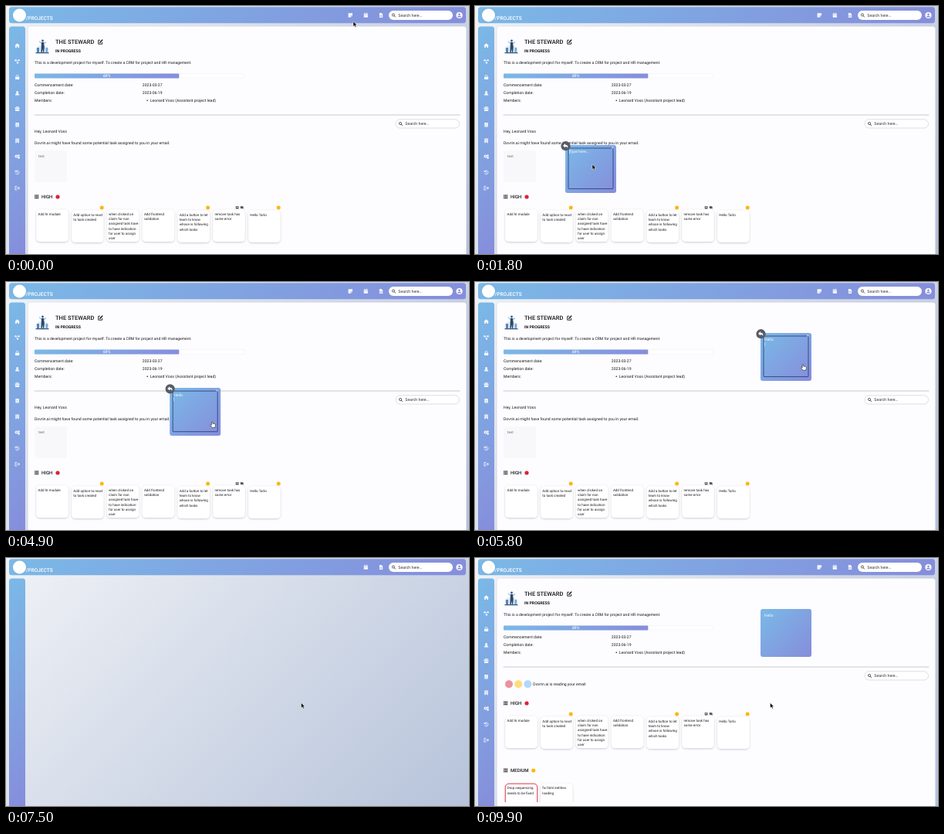
An HTML page for the animation above (10000 ms loop, 600 px wide and 321 px high).

```html
<!DOCTYPE html>
<html lang="en">
<head>
<meta charset="utf-8">
<title>Project page</title>
<style>
html, body { margin: 0; width: 100%; height: 100%; overflow: hidden; background: #d3dae8; }
svg { display: block; width: 100vw; height: 100vh; }
text { font-family: Roboto, Arial, sans-serif; white-space: pre; text-rendering: geometricPrecision; }
</style>
</head>
<body>
<svg id="stage" viewBox="0 0 600 321" preserveAspectRatio="none"></svg>
<script>
const LOOP = 10000, STEP = 100;
const INK = '#17181c', BLUE = '#7ab9e7', VIOLET = '#868ddb';

// ---- drawing helpers ----
const rect = (x, y, w, h, fill, r = 0, more = '') =>
  `<rect x="${x}" y="${y}" width="${w}" height="${h}" rx="${r}" fill="${fill}" ${more}/>`;
const dot = (x, y, r, fill, more = '') => `<circle cx="${x}" cy="${y}" r="${r}" fill="${fill}" ${more}/>`;
const path = (d, fill, more = '') => `<path d="${d}" fill="${fill}" ${more}/>`;
const line = (d, color, w) => path(d, 'none', `stroke="${color}" stroke-width="${w}" stroke-linecap="round" stroke-linejoin="round"`);
const text = (x, y, s, size = 5.12, fill = INK, weight = 400, more = '') =>
  `<text x="${x}" y="${y}" font-size="${size}" fill="${fill}" font-weight="${weight}" ${more}>${s}</text>`;
const group = (s, more = '') => `<g ${more}>${s}</g>`;
const at = (x, y, s) => group(s, `transform="translate(${x} ${y})"`);

// Diagonal 135 degree gradient over a box
function slant(id, x, y, w, h, from, to) {
  const cx = x + w / 2, cy = y + h / 2, d = (w + h) / 4;
  return `<linearGradient id="${id}" gradientUnits="userSpaceOnUse" x1="${cx - d}" y1="${cy - d}" x2="${cx + d}" y2="${cy + d}">
    <stop stop-color="${from}"/><stop offset="1" stop-color="${to}"/></linearGradient>`;
}

const lens = (x, y) => dot(x, y, 1.6, 'none', `stroke="${INK}" stroke-width=".65"`) +
  line(`M${x + 1.3} ${y + 1.3}l1.4 1.4`, INK, .7);

// Icons are centred on 0,0 and about 6 px wide
const W = '#f5f8ff';
const icons = {
  note: path('M-2.7-2.7h5.4v3.3l-2.1 2.1h-3.3z', W) + path('M.6 2.7v-2.1h2.1', 'none', `stroke="${VIOLET}" stroke-width=".5"`),
  calendar: rect(-2.6, -2.2, 5.2, 5, W, .5) + line('M-1.3-2.9v1M1.3-2.9v1', W, .8) + line('M-2.4-.8h4.8', VIOLET, .4),
  file: path('M-2.1-2.9h2.7l1.6 1.6v4.2h-4.3z', W) + line('M-1 .3h2M-1 1.5h2', VIOLET, .5),
  house: path('M-3.3 0L0-3 3.3 0h-.8v2.8h-1.7v-1.8h-1.6v1.8h-1.7v-2.8z', W),
  nodes: rect(-3.2, -2.5, 2.1, 2, W, .3) + rect(1.1, -2.5, 2.1, 2, W, .3) + rect(-.6, .8, 2.1, 2, W, .3) +
    line('M-1-1.5h2M-1.6-.6l1.4 1.6', W, .6),
  lock: rect(-2.6, -.6, 5.2, 3.4, W, .6) + line('M-1.4-.6v-.9a1.4 1.4 0 0 1 2.8 0v.9', W, .8),
  user: dot(0, -1.4, 1.5, W) + path('M-2.7 2.8a2.7 2.5 0 0 1 5.4 0z', W),
  box: rect(-3, -1.7, 6, 1.7, W, .3) + rect(-2.6, .4, 5.2, 2.4, W, .3) + line('M-1.2-1.8l-.3-1h3l-.3 1', W, .7),
  sheet: rect(-2.2, -2.8, 4.4, 5.6, W, .4) + line('M0-1.4v1.6M-.7 1.4h1.4', BLUE, .6),
  tower: path('M-2.3-2.9h4.6v5.8h-1.5v-1.5h-1.6v1.5h-1.5z', W) + line('M-1-1.5h.3M.8-1.5h.3M-1 0h.3M.8 0h.3', VIOLET, .6),
  gears: dot(-1.1, -.3, 2, W) + dot(-1.1, -.3, .7, VIOLET) + dot(1.9, -1.3, 1.2, W) + dot(2, 1.6, 1.3, W),
  history: line('M-2.3-1a2.5 2.5 0 1 1 0 2.2M-2.6-2.3v1.5h1.5M0-1.2v1.4l1 .7', W, .75),
  exit: line('M-.8-2.3h-1.8v4.6h1.8M-.7 0h3.4M1.4-1.5l1.5 1.5-1.5 1.5', W, .85)
};
const sideIcons = ['house', 'nodes', 'lock', 'user', 'box', 'sheet', 'tower', 'gears', 'history', 'exit'];

// ---- page parts ----
const topBar = rect(4, 1.2, 592, 21, 'url(#bar)', 3.5) +
  dot(17.5, 12, 8.5, '#fff', 'filter="url(#soft)"') +
  text(25.6, 17.5, '/PROJECTS', 6.6, '#fff', 500) +
  at(466.3, 12, icons.calendar) + at(486, 12, icons.file) +
  rect(496, 6, 83, 12, '#fff', 6) + lens(502, 11.5) + text(508.3, 13.8, 'Search here...', 5.2, '#333') +
  dot(587.5, 12, 4.1, '#fff') + dot(587.5, 10.8, 1.3, VIOLET) + path('M585 14.6a2.5 2 0 0 1 5 0z', VIOLET);

const picture = `<ellipse cx="47" cy="56" rx="8.5" ry="5" fill="#dfecf8"/>` +
  rect(40, 54, 3, 7, '#5585b5') + rect(51.5, 54, 2.6, 7, '#79a9d8') + rect(38.5, 60, 17, 1.3, '#3d5c80') +
  path('M46 47h3l.8 6.5-.6 6.5h-1.2l-.5-4.5-.8 4.5h-1.4z', '#2c4868') + dot(47.5, 45, 1.4, '#3c5878') +
  line('M46 48.5l-2.6-2.5M49 48.5l2.6-1.5', '#4c8cc8', .9);

const details = [['Commencement date:', '2023-03-27'], ['Completion date:', '2023-06-19'], ['Members:', '']]
  .map(([k, v], i) => text(37, 103.9 + i * 10, k) + text(176.8, 103.9 + i * 10, v)).join('');

const panel = rect(28.5, 26.5, 568, 300, '#fdfcfe', 3.5, 'filter="url(#soft)"') + picture +
  text(64, 49, 'THE STEWARD', 7.5, INK, 500) +
  line('M121.7 44.2h-2v5h5v-2', INK, .9) + line('M121.8 47.2l3-3.2', INK, 1.4) +
  text(64, 60.3, 'IN PROGRESS', 5.2, INK, 700) +
  text(37, 74.8, 'This is a development project for myself. To create a CRM for project and HR management.', 5.05) +
  rect(37.2, 87.6, 271, 5.6, '#fff', 1, 'stroke="#e9eaf0" stroke-width=".5"') +
  rect(37, 87.4, 187.3, 6, 'url(#meter)', 1) + text(130.7, 92.2, '69%', 5, '#fff', 500, 'text-anchor="middle"') +
  details + dot(183.2, 122.2, .8, INK) + text(186.8, 123.9, 'Leonard Voss (Assistant project lead)') +
  line('M37 141h551', '#bcbdc4', .8) +
  rect(505, 146.8, 82.5, 11.2, '#fff', 5.6, 'stroke="#cfd0d8" stroke-width=".7"') +
  lens(511, 152) + text(517.3, 154.2, 'Search here...', 5.2, '#333');

const mail = text(37, 163.8, 'Hey, Leonard Voss') +
  text(37, 178.8, 'Dovrin.ai might have found some potential task assigned to you in your email.') +
  rect(37, 187, 42, 41, '#f8f8fb', 3) + text(42, 196, 'test', 4.6, '#666');

const loader = ['#dc3545', '#ffc107', '#6db8f5'].map((c, i) => dot(0, 0, 5, c, `class="grow" data-x="${44 + i * 12.2}"`)).join('') +
  text(75.3, 165, 'Dovrin.ai is reading your email');

function heading(y, name, color, x) {
  let s = '';
  for (let i = 0; i < 9; i++) s += rect(37.2 + i % 3 * 1.8, y - 2.6 + (i / 3 | 0) * 1.8, 1.3, 1.3, INK);
  return s + text(46, y + 2.1, name, 6, INK, 500) + dot(x, y, 2.6, color);
}

const AMBER = '#fbb80f';
const cardBox = (x, y, more = '') => rect(x, y, 41.4, 41.5, '#fff', 4.5, `filter="url(#lift)" ${more}`);
const lines = (x, y, rows) => rows.map((s, i) => text(x, y + i * 6.3, s, 4.5)).join('');
const cards = [
  ['Add hr module'],
  ['Add option to react', 'to task created'],
  ['when clicked on', 'claim for non', 'assigned task have', 'to have indication', 'for user to assign', 'user'],
  ['Add frontend', 'validation'],
  ['Add a button to let', 'team to know', 'whose is following', 'which tasks'],
  ['remove task has', 'some error'],
  ['Hello Tarlo']
].map((rows, i) => {
  const x = 39.3 + i * 45.8, flagged = [1, 4, 6].includes(i), y = flagged ? 264.4 : 263.6;
  return cardBox(x, y) + lines(x + 2.2, y + 7.2, rows) + (flagged ? dot(x + 39.1, 261, 2.5, AMBER) : '');
}).join('') +
  rect(297.7, 259, 3.8, 3.6, '#555', .6) + rect(298.6, 259.8, 2, 1, '#fff') +
  `<ellipse cx="305.7" cy="260.7" rx="2.1" ry="1.6" fill="#555"/>` + line('M303.6 259.2l4.2 3.2', '#555', .5);

const medium = heading(334, 'MEDIUM', AMBER, 75.7) + group(
  cardBox(39.3, 351.2, 'id="alert" stroke-width=".9"') + lines(41.7, 358.2, ['Drop sequencing', 'needs to be fixed']) +
  cardBox(85.1, 351.2) + lines(87.3, 358.2, ['fix html entities', 'loading']), 'clip-path="url(#fold)"');

const note = rect(0, 0, 66, 62, 'url(#sticky)', 3) +
  group(rect(4, 4, 58, 52.6, 'none', .5, 'stroke="#22356f" stroke-width=".8"') +
    line('M60.3 2.5l1.8 1.8M62.1 2.5l-1.8 1.8', '#fff', .6) + dot(.5, 1.2, 6.1, '#575c66') +
    path('M-3 .8l3.1-2.7v1.6c2.4 0 3.8 1.3 3 4.1-.6-1.4-1.5-1.9-3-1.9v1.6z', '#fff'), 'id="edit"') +
  text(5, 10.4, '', 5.1, '#f8fbff', 400, 'id="typed"') +
  rect(0, 0, .5, 5.2, '#fff', 0, 'id="caret"');

const arrow = path('M0 0v6.6l1.6-1.4 1.1 2.4 1.2-.5-1.1-2.4h2z', '#000', 'stroke="#fff" stroke-width=".5" id="arrow"');
const hand = path('M-.8 4v-4.2q.8-1 1.5 0v2.2l3 .6q.8.3.7 1.2l-.5 3.4h-3.9l-2.3-2.9q.2-1.1 1.5-.3z', '#fff', 'stroke="#222" stroke-width=".6" id="hand"');

const stage = document.getElementById('stage');
stage.innerHTML = `<defs>
  ${slant('back', 0, 0, 600, 321, '#f0f2f6', '#b6c3da')}
  ${slant('bar', 4, 1, 592, 21, BLUE, VIOLET)}
  ${slant('side', 4, 27, 21, 294, BLUE, VIOLET)}
  ${slant('meter', 37, 87, 187, 7, BLUE, VIOLET)}
  ${slant('sticky', 0, 0, 66, 62, BLUE, VIOLET)}
  <filter id="soft" x="-20%" y="-20%" width="140%" height="140%"><feDropShadow dx="0" dy=".3" stdDeviation=".8" flood-color="#55608a" flood-opacity=".22"/></filter>
  <filter id="lift" x="-20%" y="-20%" width="140%" height="140%"><feDropShadow dx="0" dy=".8" stdDeviation=".9" flood-color="#444a60" flood-opacity=".3"/></filter>
  <clipPath id="fold"><rect x="28" y="340" width="570" height="35"/></clipPath>
</defs>` +
  rect(0, 0, 600, 321, 'url(#back)') + topBar +
  rect(4, 26.5, 21, 300, 'url(#side)', 3.5) +
  group(at(446.3, 12, icons.note) + sideIcons.map((n, i) => at(14.6, 51.3 + i * 20.5, icons[n])).join('') + panel +
    group(mail, 'id="mail"') + group(loader, 'id="loader"') +
    group(heading(247, 'HIGH', '#df2136', 67) + cards + medium, 'id="board"') +
    group(note, 'id="note"'), 'id="page"') +
  group(arrow + hand, 'id="cursor"');

// ---- motion ----
const el = {};
for (const id of ['page', 'mail', 'loader', 'board', 'note', 'edit', 'typed', 'caret', 'alert', 'cursor', 'arrow', 'hand'])
  el[id] = document.getElementById(id);
const dots = [...document.querySelectorAll('.grow')];

const EDIT_FROM = 1700, TYPE_FROM = 2500, NEW_LINE = 3600, DRAG_FROM = 4400, DRAG_TO = 5600,
  EDIT_TO = 6600, BLANK_FROM = 7400, BLANK_TO = 7800;
const pointerPath = [[0, 450, 20], [400, 447.5, 13], [900, 447.5, 13], [1600, 152, 205], [3700, 152, 205],
  [4200, 172, 226], [DRAG_FROM, 172, 226], [DRAG_TO, 425, 107], [5900, 425, 107], [6500, 382.5, 187.5], [LOOP, 382.5, 187.5]];
const notePath = [[0, 117, 180], [DRAG_FROM, 117, 180], [DRAG_TO, 370, 66], [LOOP, 370, 66]];
const typing = [[0, 'Type here...'], [TYPE_FROM, 'H'], [2700, 'He'], [2900, 'Hel'], [3100, 'Hell'], [3300, 'Hello']];

const within = (t, a, b) => t >= a && t < b;
const show = (node, on) => node.setAttribute('visibility', on ? 'inherit' : 'hidden');
const place = (node, [x, y], more = '') => node.setAttribute('transform', `translate(${x} ${y})${more}`);

function along(steps, t) {
  const i = Math.max(1, steps.findIndex(s => s[0] > t));
  const [t0, x0, y0] = steps[i - 1], [t1, x1, y1] = steps[i];
  const p = (t - t0) / (t1 - t0), k = p * p * (3 - 2 * p);
  return [x0 + (x1 - x0) * k, y0 + (y1 - y0) * k];
}

function drawNote(t) {
  show(el.note, t >= 600);
  place(el.note, along(notePath, t));
  show(el.edit, within(t, EDIT_FROM, EDIT_TO));
  el.typed.textContent = typing.filter(s => s[0] <= t).pop()[1];

  const onText = within(t, TYPE_FROM, NEW_LINE);
  const x = onText ? 5.3 + el.typed.getComputedTextLength() : 5;
  place(el.caret, [x, t < NEW_LINE ? 6 : 12]);
  show(el.caret, within(t, EDIT_FROM, EDIT_TO) && (onText || (t + LOOP - NEW_LINE) % 1000 < 500));
}

function drawCursor(t) {
  place(el.cursor, along(pointerPath, t));
  show(el.cursor, !within(t, TYPE_FROM, 3700));
  const pointing = within(t, 300, 1000) || within(t, 4100, 6000);
  show(el.arrow, !pointing);
  show(el.hand, pointing);
}

// Loader dots grow in, then fade out
function drawLoader(t) {
  const p = Math.max(0, t - 7850) % 750 / 750;
  for (const d of dots) {
    place(d, [d.dataset.x, 163.3], ` scale(${Math.min(1, p * 2)})`);
    d.setAttribute('opacity', p < .5 ? p * 2 : 2 - p * 2);
  }
}

function drawAlert(t) {
  const glow = .5 - .5 * Math.cos(2 * Math.PI * (t - BLANK_TO) / 1400);
  const mix = (a, b) => Math.round(a + (b - a) * glow);
  el.alert.setAttribute('stroke', `rgb(${mix(165, 228)},${mix(140, 45)},${mix(145, 55)})`);
}

function draw(t) {
  const reading = t >= BLANK_TO;
  el.page.setAttribute('display', within(t, BLANK_FROM, BLANK_TO) ? 'none' : 'inline');
  show(el.mail, !reading);
  show(el.loader, reading);
  place(el.board, [0, reading ? -59 : 0]);
  drawNote(t);
  drawCursor(t);
  drawLoader(t);
  drawAlert(t);
}

const start = performance.now();
function frame() {
  const t = (performance.now() - start) % LOOP;
  draw(Math.floor(t / STEP) * STEP);
  requestAnimationFrame(frame);
}
frame();
</script>
</body>
</html>
```
